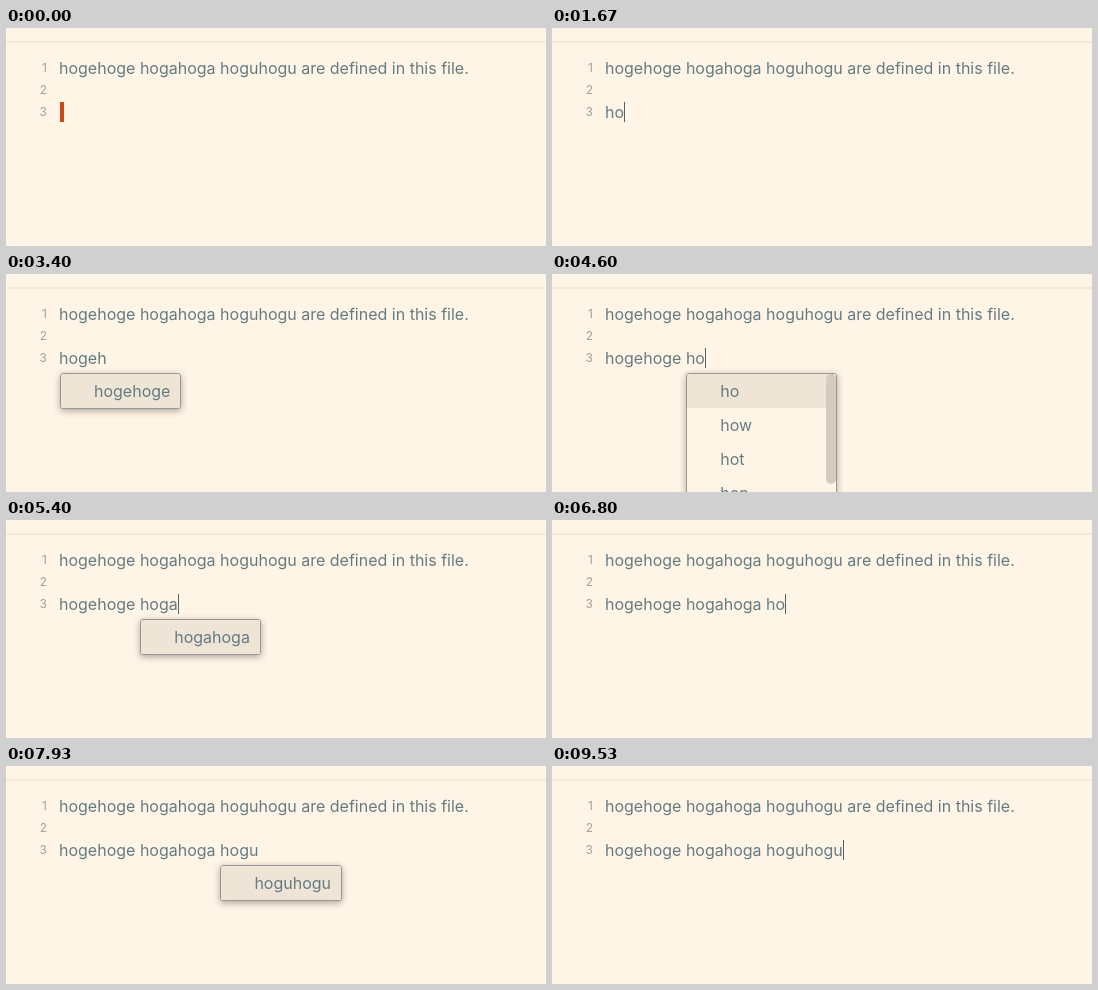
Recreate the animation shown at these times as an HTML page. Size 540 by 218 pixels, loop 9.94 s.

```html
<!DOCTYPE html>
<html lang="en">
<head>
<meta charset="utf-8">
<title>Word completion</title>
<style>
  html, body { margin: 0; width: 100%; height: 100%; overflow: hidden; background: #fff5e6; }
  body { position: relative; font: 16px/22px Inter, sans-serif; color: #657b83; }
  body > * { position: absolute; white-space: pre; }
  #rule { top: 13px; left: 0; right: 0; height: 2px; background: #f5e9dc; }
  #gutter { top: 29px; right: calc(100% - 41px); font-size: 12px; line-height: 21px; text-align: right; color: #a89e93; }
  #gutter div { height: 22px; }
  .line { left: 53px; top: 29px; }
  #typed { top: 73px; }
  #caret { position: absolute; top: 1px; width: 1px; height: 20px; background: #50636a; }
  #caret.off { display: none; }
  #caret.block { margin-left: 1px; width: 4px; background: #cb4b16; }
  #menu {
    top: 99px; box-sizing: border-box; overflow: hidden; background: #fff5e6;
    border: 1px solid #999896; border-radius: 3px; box-shadow: 0 2px 7px rgba(0, 0, 0, .33);
  }
  #menu div { height: 34px; line-height: 34px; padding: 0 10px 0 33px; }
  #menu div:first-child { background: #eee5d7; }
  #menu.long { width: 151px; height: 206px; }
  #menu.long::after {
    content: ""; position: absolute; top: 0; right: 0; width: 10px; height: 110px;
    border-radius: 5px; background: #d6cbbe;
  }
</style>
</head>
<body>
<div id="rule"></div>
<div id="gutter"><div>1</div><div>2</div><div>3</div></div>
<div class="line">hogehoge hogahoga hoguhogu are defined in this file.</div>
<div class="line" id="typed"><span id="text"></span><i id="caret"></i></div>
<div id="menu"></div>
<script>
const LOOP = 9940;
const [text, caret, menu] = ["text", "caret", "menu"].map(id => document.getElementById(id));
const words = ["hogehoge", "hogahoga", "hoguhogu"];
const common = ["ho", "how", "hot", "hop", "hope", "home"];

// Each step: start in ms, typed text, menu items, caret style
const steps = [
  [0, "", [], "block"],
  [470, "", []],
  [800, "", [], "off"],
  [1470, "h", []],
  [1670, "ho", []],
  [1735, "ho", common],
  [2070, "hog", common],
  [2200, "hog", words],
  [2470, "hoge", words],
  [2600, "hoge", ["hogehoge"]],
  [2800, "hogeh", ["hogehoge"]],
  [3395, "hogeh", ["hogehoge"], "off"],
  [3730, "hogehoge", []],
  [4070, "hogehoge ", []],
  [4330, "hogehoge h", []],
  [4470, "hogehoge ho", []],
  [4598, "hogehoge ho", common],
  [4930, "hogehoge hog", common],
  [5065, "hogehoge hog", words],
  [5200, "hogehoge hoga", words],
  [5330, "hogehoge hoga", ["hogahoga"]],
  [5795, "hogehoge hoga", ["hogahoga"], "off"],
  [6000, "hogehoge hogahoga", []],
  [6400, "hogehoge hogahoga ", []],
  [6730, "hogehoge hogahoga h", []],
  [6798, "hogehoge hogahoga ho", []],
  [6930, "hogehoge hogahoga ho", common],
  [7070, "hogehoge hogahoga hog", common],
  [7200, "hogehoge hogahoga hog", words],
  [7335, "hogehoge hogahoga hogu", words],
  [7465, "hogehoge hogahoga hogu", ["hoguhogu"]],
  [7930, "hogehoge hogahoga hogu", ["hoguhogu"], "off"],
  [8330, "hogehoge hogahoga hoguhogu", []],
  [8870, "hogehoge hogahoga hoguhogu", [], "off"],
  [9530, "hogehoge hogahoga hoguhogu", []]
];

let shown;

function show([, typed, items, style = ""]) {
  const wordIndex = typed.split(" ").length - 1;
  text.textContent = typed;
  caret.className = style;
  menu.hidden = !items.length;
  menu.className = items === common ? "long" : "";
  menu.style.left = 54 + 80.2 * wordIndex + "px";
  menu.innerHTML = items.map(item => `<div>${item}</div>`).join("");
}

function tick() {
  const time = performance.now() % LOOP;
  const step = steps.findLast(([start]) => start <= time);
  if (step !== shown) show(shown = step);
  requestAnimationFrame(tick);
}
tick();
</script>
</body>
</html>
```
